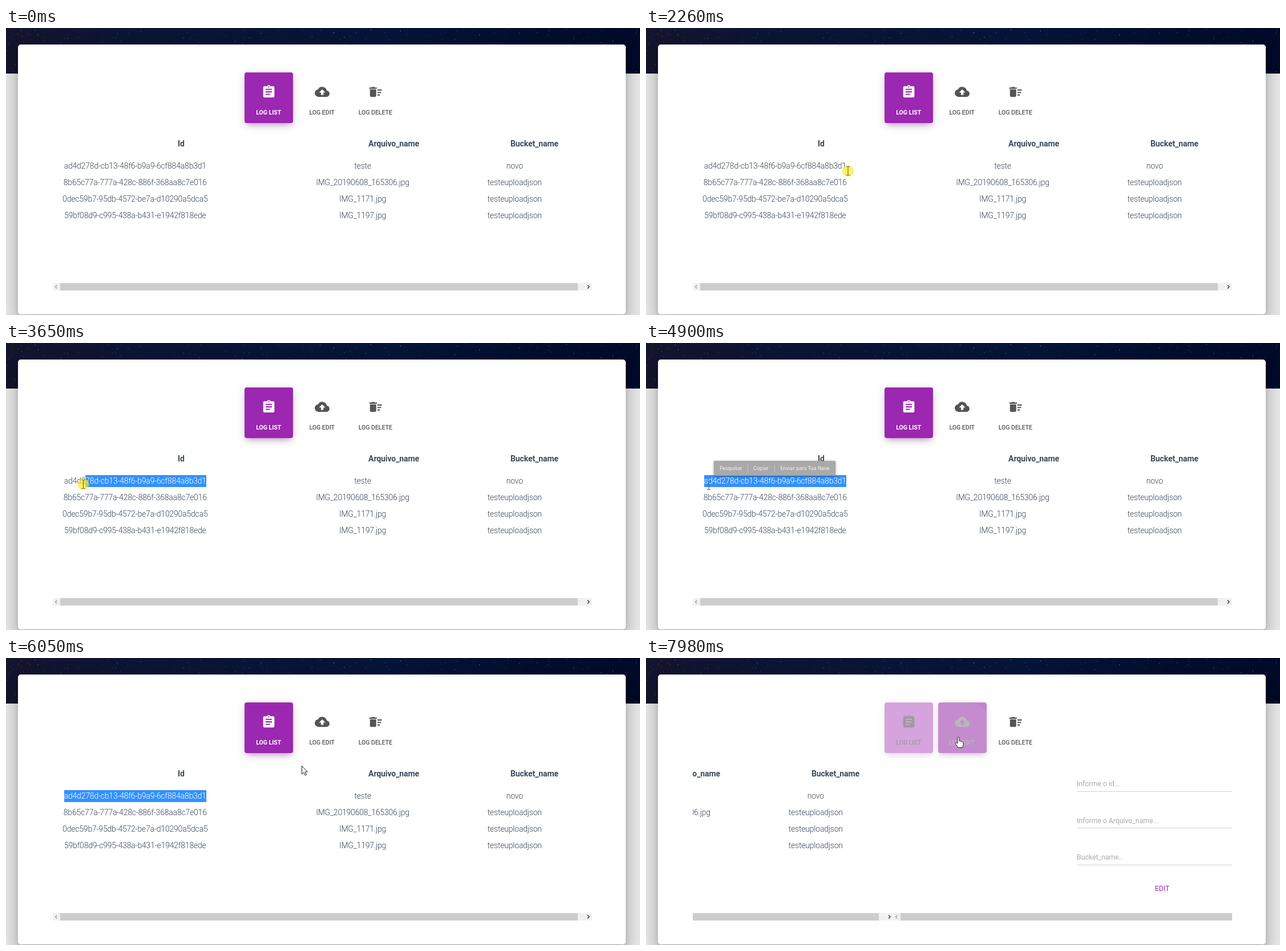
Write an HTML page with a canvas that moves like this. It is 1111 by 504 pixels and loops after 8 s.

```html
<!DOCTYPE html>
<html lang="pt">
<head>
<meta charset="utf-8">
<title>Log list</title>
<style>
  html, body { margin: 0; width: 100%; height: 100%; overflow: hidden; background: #e5e5e5; }
  body * { position: absolute; }
  #stage { left: 0; top: 0; width: 1111px; height: 504px; overflow: hidden; }
  #sky { left: 0; top: 0; }
  #card { left: 21px; top: 29px; width: 1065px; height: 474px; border-radius: 5px; background: #fff;
    box-shadow: 0 14px 21px 2px rgba(0,0,0,.14), 0 5px 26px 4px rgba(0,0,0,.12), 0 7px 9px -4px rgba(0,0,0,.2); }
  .tab { top: 78.4px; width: 85px; height: 88.4px; border-radius: 4px; overflow: hidden; background: #9c27b0;
    box-shadow: 0 3.5px 17px rgba(0,0,0,.14), 0 6px 9px -4px rgba(156,39,176,.4); }
  #listTab { left: 418px; }
  #editTab { left: 512px; }
  #ripple { border-radius: 50%; background: rgba(150,150,150,.18); }
  svg { left: 0; top: 0; }
  text { font-family: Roboto, sans-serif; white-space: pre; }
  .label { font-size: 10.5px; font-weight: 500; text-anchor: middle; }
  .head { font-size: 14px; font-weight: 700; fill: #3c4858; text-anchor: middle; letter-spacing: -.1px; }
  .cell { font-size: 14px; font-weight: 300; fill: #3c4858; text-anchor: middle; letter-spacing: -.2px; }
  .hint { font-size: 12.25px; fill: #aaa; }
  .menu { font: 8.75px "Open Sans", sans-serif; fill: #fff; }
</style>
</head>
<body>
<div id="stage">
  <canvas id="sky" width="1111" height="80"></canvas>
  <div id="card"></div>
  <div id="listTab" class="tab"></div>
  <div id="editTab" class="tab"><div id="ripple"></div></div>
  <svg width="1111" height="504">
    <defs>
      <clipPath id="view"><rect x="82" y="180" width="945" height="290"/></clipPath>
      <clipPath id="selection"><rect id="range" y="232" height="21"/></clipPath>
    </defs>
    <g id="listLook">
      <path transform="translate(447.4 99) scale(1.094)" d="M19 3h-4.2a3 3 0 0 0-5.6 0H5a2 2 0 0 0-2 2v14a2 2 0 0 0 2 2h14a2 2 0 0 0 2-2V5a2 2 0 0 0-2-2zm-7 0a1 1 0 0 1 0 2 1 1 0 0 1 0-2zm2 14H7v-2h7zm3-4H7v-2h10zm0-4H7V7h10z"/>
      <text id="listLabel" class="label" x="460.2" y="151.5">LOG LIST</text>
    </g>
    <g id="editLook">
      <path transform="translate(541 99) scale(1.094)" d="M19.35 10.04A7.5 7.5 0 0 0 5.35 8.04 6 6 0 0 0 6 20h13a5 5 0 0 0 .35-9.96zM14 13v4h-4v-4H7l5-5 5 5z"/>
      <text class="label" x="553.7" y="151.5">LOG EDIT</text>
    </g>
    <g fill="#555">
      <path transform="translate(634.5 99) scale(1.094)" d="M15 16h4v2h-4zm0-8h7v2h-7zm0 4h6v2h-6zM3 18a2 2 0 0 0 2 2h6a2 2 0 0 0 2-2V8H3zM14 5h-3l-1-1H6L5 5H2v2h12z"/>
      <text class="label" x="647.3" y="151.5">LOG DELETE</text>
    </g>
    <g clip-path="url(#view)">
      <g id="panes">
        <g id="table"></g>
        <g id="form"></g>
      </g>
    </g>
    <g id="popup">
      <rect x="119" y="207" width="213" height="26" rx="1.5" fill="#a9a9a9" style="filter:drop-shadow(0 1px 2px rgba(0,0,0,.4))"/>
      <path d="M178.5 214v13M225.5 214v13" stroke="#c4c4c4"/>
      <text class="menu" x="129" y="223">Pesquisar</text>
      <text class="menu" x="188" y="223">Copiar</text>
      <text class="menu" x="235.5" y="223">Enviar para Tua Nave</text>
    </g>
    <g id="pointer">
      <circle id="press" r="10" fill="rgba(250,232,30,.68)"/>
      <path id="arrow" d="M.5.5v14.5l3.4-3.2 2.3 5.3 2.3-1-2.3-5.2h4.2z" fill="#fff" stroke="#222"/>
      <path id="beam" d="M-3-7.5h2.5l.5.5.5-.5H3M0-7V7M-3 7.5h2.5l.5-.5.5.5H3" fill="none" stroke="#555"/>
      <path id="hand" d="M-1.5 11V1.5a1.5 1.5 0 0 1 3 0V7q1.5-1 2.7.5 1.6-.7 2.5.7 1.8-.2 1.8 1.6v4L7 18.5H-.5l-5-7q0-2.5 2.4-1.6z" fill="#fff" stroke="#222"/>
    </g>
  </svg>
</div>
<script>
const LOOP = 8000, START = 180, STEP = 77.2;
const el = id => document.getElementById(id);
const node = (parent, tag, attrs, content = "") => {
  const item = document.createElementNS("http://www.w3.org/2000/svg", tag);
  for (const key in attrs) item.setAttribute(key, attrs[key]);
  item.textContent = content;
  return parent.appendChild(item);
};
const write = (parent, kind, x, y, content) => node(parent, "text", { class: kind, x, y }, content);

function drawSky() {
  const ctx = el("sky").getContext("2d");
  const shade = ctx.createLinearGradient(0, 0, 1111, 0);
  [[0, "#15142d"], [.2, "#0b1535"], [.6, "#061438"], [1, "#010a28"]].forEach(s => shade.addColorStop(...s));
  ctx.fillStyle = shade;
  ctx.fillRect(0, 0, 1111, 80);
  let seed = 7;
  const random = () => (seed = seed * 16807 % 2147483647) / 2147483647;
  for (let i = 0; i < 900; i++) {
    ctx.fillStyle = `rgba(150,175,215,${.1 + .6 * random() ** 3})`;
    const size = .7 + random() * .7;
    ctx.fillRect(random() * 1111, random() * 80, size, size);
  }
}

function scrollbar(parent, x) {
  node(parent, "rect", { x, y: 448, width: 945, height: 13, fill: "#f1f1f1" });
  node(parent, "rect", { x: x + 13, y: 448, width: 907, height: 13, fill: "#cdcdcd" });
  const chevron = (cx, dir, stroke) => node(parent, "polyline", {
    points: [[cx - dir * 1.5, 451.5], [cx + dir * 1.5, 454.5], [cx - dir * 1.5, 457.5]].join(" "),
    fill: "none", stroke, "stroke-width": 1.6
  });
  chevron(x + 6, -1, "#a8a8a8");
  chevron(x + 938.5, 1, "#444");
}

const ids = ["ad4d278d-cb13-48f6-b9a9-6cf884a8b3d1", "8b65c77a-777a-428c-886f-368aa8c7e016",
  "0dec59b7-95db-4572-be7a-d10290a5dca5", "59bf08d9-c995-438a-b431-e1942f818ede"];
const files = ["teste", "IMG_20190608_165306.jpg", "IMG_1171.jpg", "IMG_1197.jpg"];
const table = el("table"), form = el("form");
[[307, "Id"], [679.5, "Arquivo_name"], [926, "Bucket_name"]].forEach(([x, s]) => write(table, "head", x, 208, s));
ids.forEach((id, i) => {
  const y = 247 + 29 * i;
  write(table, "cell", 226.3, y, id);
  write(table, "cell", 625, y, files[i]);
  write(table, "cell", 891.3, y, i ? "testeuploadjson" : "novo");
});
const marked = node(table, "g", { "clip-path": "url(#selection)" });
node(marked, "rect", { x: 102, y: 232, width: 249, height: 21, fill: "#3390ff" });
const markedText = write(marked, "cell", 226.3, 247, ids[0]);
markedText.style.fill = "#fff";
const stops = [...ids[0]].map((_, i) => i ? markedText.getStartPositionOfChar(i).x : 102).concat(351);
scrollbar(table, 82);

["Informe o id...", "Informe o Arquivo_name...", "Bucket_name.."].forEach((hint, i) => {
  write(form, "hint", 1349, 225 + 64.7 * i, hint);
  node(form, "rect", { x: 1349, y: Math.round(233.5 + 64.7 * i), width: 300, height: 1, fill: "#d2d2d2" });
});
const edit = write(form, "hint", 1498.5, 409, "EDIT");
edit.style.cssText = "fill:#9c27b0;text-anchor:middle";
scrollbar(form, 1027);

// Pointer path: step, x, y
const path = [[0, 1007, 466], [4, 880, 392], [10, 652, 250], [12, 562, 208], [13, 505, 224], [15, 420, 254],
  [19, 359, 246], [22, 357, 254], [24, 354, 251], [27, 354, 251], [35, 269, 244], [37, 224, 245], [38, 216, 245],
  [45, 135.5, 248], [48, 114, 248], [53, 101.5, 248.5], [58, 102, 248.5], [61, 110, 250], [64, 150, 229],
  [68, 260, 224], [76, 518, 189], [77, 518, 189], [81, 449, 222], [88, 583, 267], [90, 589, 288],
  [95, 547.5, 139]];
function pointerAt(n) {
  const next = path.findIndex(p => p[0] > n);
  if (next < 0) return path.at(-1).slice(1);
  const a = path[Math.max(0, next - 1)], b = path[next];
  const k = Math.max(0, (n - a[0]) / (b[0] - a[0]));
  return [a[1] + k * (b[1] - a[1]), a[2] + k * (b[2] - a[2])];
}

const show = (id, on) => el(id).style.display = on ? "" : "none";
const within = (n, a, b) => n >= a && n < b;
const mix = (a, b, k) => Math.round(a + (b - a) * k);
const gray = v => `rgb(${v},${v},${v})`;
const nearestStop = x => stops.reduce((a, b) => Math.abs(b - x) < Math.abs(a - x) ? b : a);

function render(t) {
  const n = Math.floor((t - START) / STEP + .1);
  const [x, y] = pointerAt(n);
  show("pointer", n >= 0);
  el("pointer").setAttribute("transform", `translate(${x} ${y})`);
  show("arrow", n < 22 || within(n, 64, 94));
  show("beam", within(n, 22, 64));
  show("hand", n >= 94);
  show("press", within(n, 27, 56) || within(n, 97, 99));

  const edge = n < 27 ? 351 : n < 53 ? nearestStop(x) : 102;
  el("range").setAttribute("x", edge);
  el("range").setAttribute("width", 351 - edge);
  el("popup").style.opacity = Math.max(0, Math.min(1, (n - 57) / 3, (67 - n) / 3));

  const fade = n < 100 ? 0 : n < 101 ? .2 : .58;
  const slide = n < 100 ? 0 : n < 101 ? 160 : 594;
  el("panes").setAttribute("transform", `translate(${-slide} 0)`);
  el("listTab").style.opacity = 1 - fade;
  el("listLabel").style.fontWeight = fade ? 500 : 700;
  el("editTab").style.opacity = n < 99 ? 0 : Math.max(.1, fade);
  el("editTab").style.backgroundColor = fade ? "#9c27b0" : "transparent";
  el("editTab").style.boxShadow = fade ? "" : "none";
  el("listLook").setAttribute("fill", gray(mix(255, 85, fade)));
  el("editLook").setAttribute("fill", gray(mix(85, 255, fade)));
  const r = Math.max(0, (n - 99) * 32 + 10);
  el("ripple").style.cssText = `left:${29 - r}px;top:${65 - r}px;width:${2 * r}px;height:${2 * r}px`;
}

drawSky();
const begin = performance.now();
(function tick() {
  render((performance.now() - begin) % LOOP);
  requestAnimationFrame(tick);
})();
</script>
</body>
</html>
```
